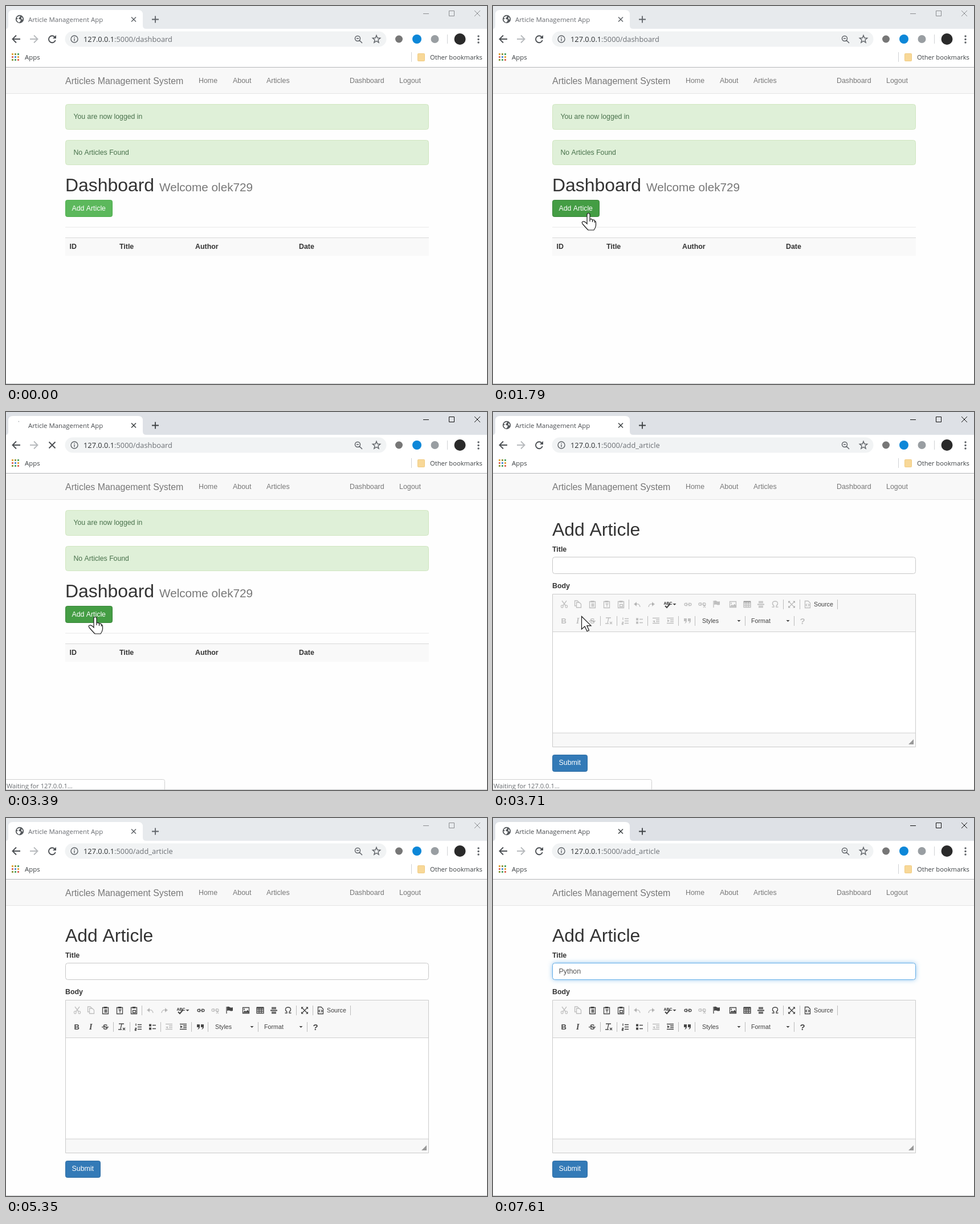
An HTML page with a canvas that plays this animation: 844x663 px, repeating every 8000 ms.

```html
<!DOCTYPE html>
<html lang="en">
<head>
<meta charset="utf-8">
<title>Article Management App</title>
<style>
html, body { margin: 0; width: 100%; height: 100%; overflow: hidden; background: #fff; }
canvas { display: block; }
</style>
</head>
<body>
<canvas id="stage" width="844" height="663"></canvas>
<script>
const ctx = document.getElementById('stage').getContext('2d');
const LOOP = 8000;
const UI = '"Open Sans", "Noto Sans", sans-serif';
const PAGE = '"Liberation Sans", Arial, sans-serif';
const GREY = '#5f6368';

// Moments of change, in ms
const FOCUS = 3240, LOADING = 3320, NEW_PAGE = 3560, EDITOR = 3710, READY = 3870,
  STATUS_END = 4100, BLUR = 5350, REFOCUS = 6610, TYPED = 7080, CARET_OFF = 7610;

// Pointer paths: [time, x, y]; the pointer is hidden after the end time
const paths = [
  { end: EDITOR + 520, keys: [
    [140, 551, 539], [300, 455, 400], [460, 300, 262], [620, 178, 190], [700, 144, 176],
    [860, 236, 235], [1020, 244, 234], [1100, 244, 234], [1260, 289, 290], [1420, 262, 372],
    [1580, 205, 394], [1740, 166, 362], [1820, 150, 356], [1900, 150, 356], [2140, 183, 394],
    [2300, 165, 375], [2380, 162, 373], [2460, 157, 362], [2540, 155, 358], [3740, 155, 358],
    [3900, 205, 410], [4220, 320, 490]] },
  { end: 7370, keys: [
    [5900, 591, 401], [6060, 480, 345], [6220, 350, 295], [6380, 281, 273],
    [7180, 281, 273], [7260, 318, 296], [7340, 355, 321]] }
];

function rect(x, y, w, h, color) {
  ctx.fillStyle = color;
  ctx.fillRect(x, y, w, h);
}

function box(x, y, w, h, r, fill, border) {
  ctx.beginPath();
  ctx.roundRect(x + .5, y + .5, w - 1, h - 1, r);
  ctx.fillStyle = fill;
  ctx.fill();
  if (border) {
    ctx.strokeStyle = border;
    ctx.lineWidth = 1;
    ctx.stroke();
  }
}

function disc(x, y, r, color) {
  ctx.beginPath();
  ctx.arc(x, y, r, 0, 7);
  ctx.fillStyle = color;
  ctx.fill();
}

function text(s, x, y, size, color, font = PAGE, weight = '') {
  ctx.font = `${weight} ${size}px ${font}`;
  ctx.fillStyle = color;
  ctx.fillText(s, x, y);
}

const bold = (s, x, y) => text(s, x, y, 12.4, '#333', PAGE, 'bold');

// Draws SVG path data around a point
function shape(x, y, line, fill, color = GREY, width = 1) {
  ctx.save();
  ctx.translate(x, y);
  ctx.strokeStyle = ctx.fillStyle = color;
  ctx.lineWidth = width;
  if (fill) ctx.fill(new Path2D(fill));
  if (line) ctx.stroke(new Path2D(line));
  ctx.restore();
}

function globe() {
  disc(24, 23, 7.2, '#55595d');
  shape(24, 23, '', 'M-5 -3Q-2 -6 1 -5.5L0 -3L-2 -2L-1 0L2 1L1 4L-1 6Q-5 4 -5.5 0L-3 0ZM3 -4L5 -2L5.5 1L3 0Z', '#fff');
}

function spinner(t) {
  const a = -1.75, sweep = .15 + Math.max(0, t - 3400) / 120;
  ctx.beginPath();
  ctx.arc(24, 23, 6.5, a - sweep, a);
  ctx.strokeStyle = '#8a8e92';
  ctx.lineWidth = 1.6;
  ctx.stroke();
}

function titleBar(t, active, loading) {
  rect(0, 0, 844, 40, active ? '#dee1e6' : '#e7eaed');
  shape(0, 0, '', 'M0 40Q4 40 4 34V15Q4 7 12 7H232Q240 7 240 15V34Q240 40 246 40Z', '#fff');
  if (loading) spinner(t); else globe();
  text('Article Management App', 39, 27.5, 11.4, active ? '#4a4d51' : '#686b70', UI);
  const mark = active ? '#3c4043' : GREY;
  shape(224, 23.5, 'M-4 -4L4 4M4 -4L-4 4', '', mark, 1.5);
  shape(262, 23.5, 'M-6 0H6M0 -6V6', '', mark, 1.8);
  const win = active ? '#111' : '#8b8d90';
  shape(732, 13.5, 'M0 0H10', '', win);
  shape(777.5, 8.5, 'M0 0H9V9H0Z', '', win);
  shape(822, 8, 'M0 0L10 10M10 0L0 10', '', win);
}

function toolbar(url, loading) {
  rect(0, 40, 844, 67, '#fff');
  const arrow = 'M7 0H-6M0 -6.5L-6.5 0L0 6.5';
  shape(18, 58, arrow, '', '#4c5054', 1.9);
  shape(49, 58, 'M-7 0H6M0 -6.5L6.5 0L0 6.5', '', '#b7babd', 1.9);
  if (loading) shape(81, 58, 'M-5.5 -5.5L5.5 5.5M5.5 -5.5L-5.5 5.5', '', '#4c5054', 1.9);
  else shape(81, 58, 'M5 -3A6 6 0 1 0 5.7 2', 'M7 -7V-1H1Z', '#4c5054', 1.9);

  box(103, 44, 565, 28, 14, '#f1f3f4');
  shape(120, 58, 'M-6 0A6 6 0 1 0 6 0A6 6 0 1 0 -6 0M0 -1V3.5M0 -3.5V-2', '', GREY, 1.4);
  const host = '127.0.0.1';
  text(host, 136, 63, 12.8, '#2b2e31', UI);
  text(':5000/' + url, 136 + ctx.measureText(host).width, 63, 12.8, '#6c7075', UI);
  shape(617, 57, 'M-4.5 0A4.5 4.5 0 1 0 4.5 0A4.5 4.5 0 1 0 -4.5 0M3.3 3.3L8 8M-2 0H2', '', GREY, 1.5);

  ctx.beginPath();
  for (let i = 0; i < 10; i++) {
    const r = i % 2 ? 3 : 7, a = i * Math.PI / 5 - Math.PI / 2;
    ctx.lineTo(650 + r * Math.cos(a), 58.5 + r * Math.sin(a));
  }
  ctx.closePath();
  ctx.strokeStyle = GREY;
  ctx.lineWidth = 1.4;
  ctx.stroke();

  disc(689.5, 58, 6.5, '#777');
  disc(721, 58, 8, '#0d87d8');
  disc(752.5, 58, 7, '#999ea2');
  rect(774, 50, 1, 16, '#d0d2d5');
  disc(796.5, 58, 10, '#2a2a2a');
  for (const y of [53, 58.5, 64]) disc(829, y, 1.7, GREY);

  const dots = ['#dc6b58', '#e0a33a', '#53a567', '#4c8bd6', '#8f9a42'];
  for (let i = 0; i < 9; i++) {
    rect(10 + i % 3 * 5, 83 + Math.floor(i / 3) * 5, 3, 3, dots[(i * 3 + 1) % 5]);
  }
  text('Apps', 33, 94, 11.4, '#3c4043', UI);
  rect(711, 81, 1, 17, '#d0d2d5');
  box(722, 83, 13, 14, 1, '#f8d898', '#f0cb82');
  text('Other bookmarks', 744, 94, 11.2, '#3c4043', UI);
  rect(0, 107, 844, 1, '#b5b7b9');
}

function navBar() {
  rect(0, 108, 844, 45, '#f8f8f8');
  rect(0, 153, 844, 1, '#e4e4e4');
  text('Articles Management System', 104, 136.5, 15.95, '#777');
  const links = { Home: 338, About: 398, Articles: 457, Dashboard: 603, Logout: 690 };
  for (const name in links) text(name, links[name], 135, 12.4, '#777');
}

function notice(s, y, h) {
  box(104, y, 638, h, 4, '#dff0d8', '#d0e6c0');
  text(s, 118.5, y + 26, 12.25, '#47704a');
}

function dashboard(hover) {
  notice('You are now logged in', 172, 45);
  notice('No Articles Found', 235, 44);
  text('Dashboard', 104, 325, 31.9, '#333');
  text('Welcome olek729', 269, 325, 20.7, '#777');
  box(104, 340, 83, 30, 3, hover ? '#449d44' : '#5cb85c', hover ? '#398439' : '#4cae4c');
  text('Add Article', 115.5, 359, 12.3, '#fff');
  rect(104, 387.5, 638, 1, '#eaeaea');
  rect(104, 406, 638, 1, '#d8d8d8');
  rect(104, 407, 638, 31, '#f9f9f9');
  const heads = { ID: 111.5, Title: 199, Author: 332, Date: 514 };
  for (const name in heads) bold(name, heads[name], 426);
}

const sheet = 'M-3 -5H-5V6H5V-5H3';
const clip = 'M-3 -6.5H3V-3.5H-3Z';
const chain = 'M-1 -2H-4Q-6 -2 -6 0Q-6 2 -4 2H-1M1 -2H4Q6 -2 6 0Q6 2 4 2H1M-3 0H3';
const bars = 'M-6 -5H6M0 -2H6M0 1H6M-6 4H6';

// [x, y, line, fill, stays disabled]
const icons = [
  [125, 337, 'M-4 -6L2.5 3M4 -6L-2.5 3M-5.5 4A1.8 1.8 0 1 0 -2 4A1.8 1.8 0 1 0 -5.5 4M2 4A1.8 1.8 0 1 0 5.5 4A1.8 1.8 0 1 0 2 4', '', 1],
  [149, 337, 'M-2.5 3H-5.5V-6H-1L2 -3M-2.5 -3H2.5L5.5 0V6H-2.5Z', '', 1],
  [174.5, 337.5, sheet + 'M-2 -1H3M-2 1H3M-2 3H3', clip],
  [199.5, 337.5, sheet + 'M-2 -1H3M.5 -1V4', clip],
  [224.5, 337.5, sheet + 'M-2 0H3V4H-2Z', clip],
  [253, 338, 'M-3 -1Q4 -3 5 4', 'M-6 -1L-1 -5V3Z', 1],
  [278, 338, 'M3 -1Q-4 -3 -5 4', 'M6 -1L1 -5V3Z', 1],
  [342, 337.5, chain, ''],
  [367, 337, chain + 'M2 2L6 6M6 2L2 6', '', 1],
  [392, 337, 'M-5 -6V6', 'M-4 -6Q-1 -7 1 -5Q3 -4 6 -5V1Q3 2 1 1Q-1 0 -4 1Z'],
  [421, 337.5, 'M-5.5 -5H5.5V5H-5.5Z', 'M-5 4L-2 0L0 2L3 -1L5 2V4ZM-4 -3H-2V-1H-4Z'],
  [446, 337.5, 'M-6 -5H6V5H-6ZM-6 2H6M-2 -4V5M2 -4V5M-6 -1H6', 'M-6 -6H6V-3H-6Z'],
  [470, 337.5, 'M-4 -5H4M-4 -3H4M-4 3H4M-4 5H4', 'M-6 -1H6V1H-6Z'],
  [495, 337, 'M-5.5 5H-2V3Q-5 1 -4.5 -2Q-4 -5 0 -5Q4 -5 4.5 -2Q5 1 2 3V5H5.5', ''],
  [524, 337.5, 'M-5 -5L5 5M5 -5L-5 5', 'M-6 -6H-2L-6 -2ZM6 -6H2L6 -2ZM-6 6H-2L-6 2ZM6 6H2L6 2Z'],
  [552, 337.5, 'M-4.5 -6H1L4.5 -2.5V6H-4.5ZM-1 -1L-3 1L-1 3M1 -1L3 1L1 3', ''],
  [203, 366, 'M-5 -5H4M0 -5L-2 4M-6 5H0M2 2L6 6M6 2L2 6', ''],
  [232, 366.5, 'M-1 -4H6M-1 0H6M-1 4H6M-4 -6V-2M-5.5 2H-3.5V4H-5.5V6H-3', ''],
  [257, 366.5, 'M0 -3H6M0 3H6', 'M-6 -5H-2V-1H-6ZM-6 1H-2V5H-6Z'],
  [286, 366.5, bars, 'M-2 -1L-6 0L-2 3Z', 1],
  [311, 366.5, bars, 'M-5 -3L-1 0L-5 2Z'],
  [341, 366, '', 'M-6 -4H-1V0Q-1 4 -5 5Q-3 3 -3 1H-6ZM1 -4H6V0Q6 4 2 5Q4 3 4 1H1Z']
];

function editor(ready) {
  const alpha = on => { ctx.globalAlpha = on ? 1 : .32; };
  const ink = '#464646';
  box(104, 319, 638, 269, 0, '#fff', '#cbcbcb');
  rect(105, 320, 636, 65, '#f8f8f8');
  rect(105, 385, 636, 1, '#cfcfcf');
  rect(105, 563, 636, 24, '#f8f8f8');
  rect(105, 562.5, 636, 1, '#cfcfcf');
  shape(738, 583, '', 'M0 0V-9L-9 0Z', '#999');

  for (const [x, y, line, fill, off] of icons) {
    alpha(ready && !off);
    shape(x, y, line, fill, ink, 1.3);
  }
  alpha(ready);
  text('B', 119.5, 371, 13, ink, PAGE, 'bold');
  text('I', 146, 371, 14, ink, '"Liberation Serif", serif', 'italic bold');
  text('S', 170, 371, 13, ink, PAGE, 'bold');
  rect(168, 366, 12, 1.3, ink);
  text('?', 538.5, 371.5, 15, ink, PAGE, 'bold');
  alpha(true);

  text('ABC', 299.5, 338, 7, '#333', PAGE, 'bold');
  shape(306, 340, 'M-4 0L-1 3L5 -4', '', ink, 2);
  const label = (s, x, y) => text(s, x, y, 10.7, '#404040');
  label('Source', 563, 341);
  label('Styles', 367, 370);
  label('Format', 453, 370);
  for (const [x, y] of [[318.5, 337], [431.5, 366], [517.5, 366]]) shape(x, y, '', 'M-3 -1H3L0 2Z', '#444');
  for (const x of [238, 509, 538, 604]) rect(x, 329, 1, 17, '#bcbcbc');
  for (const x of [188, 217, 271, 325, 354, 442, 528]) rect(x, 358, 1, 17, '#bcbcbc');
}

function form(t) {
  text('Add Article', 104, 217, 31.9, '#333');
  bold('Title', 104, 245);
  const glow = Math.min(1, Math.max(0, (t - REFOCUS) / 150));
  if (glow) {
    ctx.save();
    ctx.shadowColor = `rgba(102,175,233,${.75 * glow})`;
    ctx.shadowBlur = 8;
    box(104, 254, 638, 30, 4, '#fff');
    ctx.restore();
  }
  box(104, 254, 638, 30, 4, '#fff', '#c8c8c8');
  if (glow) {
    ctx.globalAlpha = glow;
    box(104, 254, 638, 30, 4, '#fff', '#66afe9');
    ctx.globalAlpha = 1;
    const typed = t >= TYPED;
    if (typed) text('Python', 115.5, 273, 12.4, '#555');
    if (t < CARET_OFF) rect(typed ? 154 : 116, 263, 1, 13, '#444');
  }
  bold('Body', 104, 309);
  let y = 601;
  if (t < EDITOR) {
    box(104, 319, 638, 193, 4, '#fff', '#c8c8c8');
    y = 525;
  } else {
    editor(t >= READY);
  }
  box(104, y, 62, 30, 3, '#337ab7', '#2e6da4');
  text('Submit', 115.5, y + 18, 12.4, '#fff');
}

function status(t) {
  if (t < 2710 || t >= STATUS_END) return;
  const waiting = t >= LOADING;
  ctx.globalAlpha = t < 2790 ? .5 : 1;
  box(-4, 644, waiting ? 283 : 147, 24, 3, '#fff', '#d0d0d0');
  text(waiting ? 'Waiting for 127.0.0.1...' : '127.0.0.1:5000/add_article', 1, 660, 11.15, '#666a6e', UI);
  ctx.globalAlpha = 1;
}

// The pointer moves in steps of 80 ms
function pointer(t) {
  const q = Math.floor((t - 60) / 80) * 80 + 60;
  const path = paths.find(p => q >= p.keys[0][0] && t < p.end);
  if (!path) return null;
  const { keys } = path;
  const i = keys.findIndex(k => k[0] > q);
  if (i < 0) return keys[keys.length - 1].slice(1);
  const [t0, x0, y0] = keys[i - 1], [t1, x1, y1] = keys[i];
  const f = (q - t0) / (t1 - t0);
  return [x0 + (x1 - x0) * f, y0 + (y1 - y0) * f].map(Math.round);
}

const ARROW = 'M.5 .5V23L6 18L10 26.5L13.5 25L9.8 16.8H17Z';
const HAND = 'M-1 4Q-1 1.5 1.5 1.5Q4 1.5 4 4V12Q8 11 8.5 13.5Q12 12.5 12.5 15Q14.5 15 14.5 18V23Q14 27 11 31H1Q-3 27 -9 20Q-11 17 -8 16Q-5 15.5 -1 20Z';

function drawPointer(t, pos, hover) {
  const [x, y] = pos;
  const beam = (t > 3800 && t < 5000 && y > 386) || (t > 5800 && (y > 386 || y < 284));
  if (beam) {
    shape(x + .5, y, 'M-3 -7.5H-1L0 -6.5L1 -7.5H3M0 -6.5V6.5M-3 7.5H-1L0 6.5L1 7.5H3', '', '#222');
    return;
  }
  const outline = hover ? HAND : ARROW;
  shape(x, y, '', outline, '#fff');
  shape(x, y, outline + (hover ? 'M-1 4V20M4 12V16M8.5 13.5V17M12.5 15V18' : ''), '', '#1a1a1a', 1.2);
}

function draw(t) {
  const active = (t >= FOCUS && t < BLUR) || t >= REFOCUS;
  const loading = t >= LOADING && t < NEW_PAGE;
  const first = t < NEW_PAGE;
  const pos = pointer(t);
  const hover = first && pos && pos[0] >= 104 && pos[0] < 187 && pos[1] >= 340 && pos[1] < 370;

  rect(0, 0, 844, 663, '#fefefe');
  titleBar(t, active, loading);
  toolbar(first ? 'dashboard' : 'add_article', loading);
  navBar();
  if (first) dashboard(hover); else form(t);
  status(t);
  rect(0, 662, 844, 1, '#c4c6c8');
  if (pos) drawPointer(t, pos, hover);
}

const start = performance.now();
function frame() {
  draw((performance.now() - start) % LOOP);
  requestAnimationFrame(frame);
}
frame();
</script>
</body>
</html>
```
